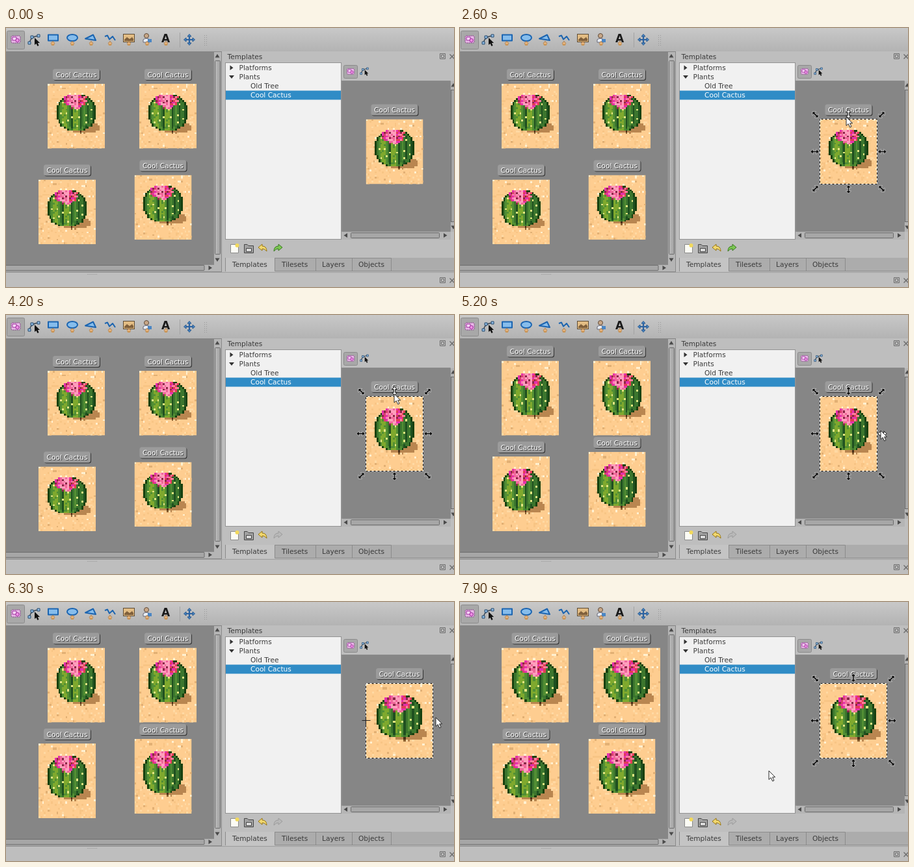
Recreate the animation shown at these times as an HTML page. Size 689 by 399 pixels, loop 8 s.

```html
<!DOCTYPE html>
<html lang="en">
<head>
<meta charset="utf-8">
<title>Template editor</title>
<style>
html, body { margin: 0; width: 100%; height: 100%; overflow: hidden; background: #bebebe; }
svg { display: block; width: 689px; height: 399px; }
text { font: 10.6px "DejaVu Sans", sans-serif; fill: #3a3a3a; }
.light { fill: #fff; }
.chip text { text-anchor: middle; }
</style>
</head>
<body>
<svg viewBox="0 0 689 399">
  <defs>
    <linearGradient id="bar" x2="0" y2="1"><stop stop-color="#c8c8c8"/><stop offset="1" stop-color="#b3b3b3"/></linearGradient>
    <linearGradient id="thumb"><stop stop-color="#b9b9b9"/><stop offset="1" stop-color="#a2a2a2"/></linearGradient>
    <symbol id="tile" viewBox="0 0 32 36" preserveAspectRatio="none"></symbol>
    <g id="hand">
      <path d="M-4-1Q-4-3-1-3L-1-5H1L1-3Q4-3 4-1L3 2H-3Z" fill="#e6b47c" stroke="#9c6c3a" stroke-width=".8"/>
      <path d="M-3 2H3V4H-3Z" fill="#d09040"/>
    </g>
    <path id="arrow" d="M-6.5 0L-2.5-4V-1.2H2.5V-4L6.5 0L2.5 4V1.2H-2.5V4Z" stroke-linejoin="round"/>
    <path id="turn" d="M-7-1L-1-6V-3Q6-3 6 5Q3 1-1 1V4Z" stroke-width="1" stroke-linejoin="round"/>
    <g id="dock" fill="none" stroke="#6c6c6c">
      <path d="M667.500-4.500h8v8h-8zM669.500-2.500h4v4h-4z"/>
      <path d="M682.500-3.500l7 7M689.500-3.500l-7 7" stroke-width="1.4"/>
    </g>
    <g id="pick" stroke="#9c2f9c">
      <rect x="-7" y="-5" width="14" height="11" rx="2" fill="#e9b8e8" stroke="#7d3a80" stroke-dasharray="2 1"/>
      <path d="M-5-3H1V2H-5Z" fill="#f7d8f6"/>
      <circle cx="2.500" cy="2" r="2.700" fill="#ee8fe4"/>
    </g>
    <g id="nodes">
      <path d="M-7 6Q-5-4 7-5" fill="none" stroke="#3b4a58" stroke-width="1.6"/>
      <path d="M-9 4h4v4h-4zM-5-5h4v4h-4zM5-7h4v4h-4z" fill="#8fbbe4" stroke="#24486c"/>
      <path d="M1-2V9L3.500 7L5.500 11L7.500 10L5.800 6H9Z" fill="#111"/>
    </g>
  </defs>

  <rect width="689" height="399" fill="#bebebe"/>
  <rect width="689" height="36" fill="url(#bar)"/>
  <path d="M0 36.500H332" stroke="#858585"/>

  <!-- main toolbar -->
  <rect x="1.500" y="4.500" width="27" height="28" rx="2" fill="#a8a8a8" stroke="#8a8a8a"/>
  <use href="#pick" x="15" y="17"/>
  <use href="#nodes" x="43" y="17"/>
  <g fill="#86bdec" stroke="#1b64b0" stroke-width="2" stroke-linejoin="round">
    <rect x="65" y="10.500" width="15" height="9"/>
    <ellipse cx="102" cy="15" rx="8" ry="5"/>
    <path d="M122 16.500L134 10.500L138 19Z"/>
    <path d="M152 13L156 11.500L159 17.500L164 13L168 19" fill="none"/>
  </g>
  <rect x="180.500" y="9.500" width="17" height="12" fill="#e3bd84" stroke="#5c4a34"/>
  <path d="M182 18L186 14L190 17L194 14L196 17V20H182Z" fill="#80603c"/>
  <circle cx="216" cy="12" r="3.500" fill="#c9a888" stroke="#5c4838"/>
  <path d="M211 22V18Q216 14 221 18V22Z" fill="#e9eef5" stroke="#667"/>
  <path d="M218 17H224V22H218Z" fill="#4a86c4"/>
  <text x="239" y="22" style="font-weight:bold;font-size:17px;fill:#1a1a1a">A</text>
  <g id="hands"></g>
  <path d="M267.500 7V30" stroke="#a2a2a2"/>
  <path d="M282 12V24M276 18H288" stroke="#2c62a0" stroke-width="2.200"/>
  <path d="M282 9.500L285 13H279ZM282 26.500L285 23H279ZM273.500 18L277 15V21ZM290.500 18L287 15V21Z" fill="#4c8cca" stroke="#24568e"/>
  <path d="M305.500 11V27M308.500 11V27" stroke="#989898" stroke-dasharray="1 2"/>

  <!-- map view -->
  <rect y="37" width="320" height="327" fill="#868686"/>
  <rect x="320" y="37" width="11" height="327" fill="#b5b5b5"/>
  <rect x="321.500" y="50.500" width="8" height="298" rx="1" fill="url(#thumb)" stroke="#6a6a6a"/>
  <rect y="364" width="331" height="12" fill="#b5b5b5"/>
  <rect x="-3" y="365.500" width="308" height="8" rx="1" fill="#a6a6a6" stroke="#6a6a6a"/>
  <path d="M331.500 37V376M0 364.500H320M0 375.500H331" stroke="#898989" fill="none"/>
  <path d="M125 379.500H141" stroke="#999" stroke-dasharray="1 1"/>

  <!-- template dock -->
  <text x="340.500" y="48">Templates</text>
  <use href="#dock" y="44"/><use href="#dock" y="389"/>
  <rect x="337.500" y="53.500" width="178" height="272" fill="#f1f1f1" stroke="#929292"/>
  <rect x="338" y="96.500" width="177" height="14" fill="#308cc6"/>
  <path d="M344.500 57.500V65L349.500 61.200Z M343 73H351L347 78Z" fill="#333"/>
  <text x="358.500" y="65">Platforms</text>
  <text x="358.500" y="79">Plants</text>
  <text x="376" y="93">Old Tree</text>
  <text x="376" y="107" class="light">Cool Cactus</text>
  <rect x="519.500" y="57.500" width="21" height="20" rx="2" fill="#a8a8a8" stroke="#8a8a8a"/>
  <use href="#pick" transform="translate(530 66.500) scale(.8)"/>
  <use href="#nodes" transform="translate(551 66) scale(.7)"/>
  <rect x="516" y="82" width="167" height="231" fill="#868686"/>
  <path d="M516 81.500H683.500V313.500H516.500V81.500" fill="none" stroke="#8c8c8c"/>
  <rect x="684" y="82" width="6" height="232" fill="#b5b5b5"/>
  <rect x="684.500" y="95.500" width="9" height="203" fill="#a6a6a6" stroke="#6a6a6a"/>
  <rect x="516" y="314" width="168" height="12" fill="#b5b5b5"/>
  <rect x="530.500" y="315.500" width="136" height="8" rx="1" fill="#a6a6a6" stroke="#6a6a6a"/>
  <g id="arrows" fill="#4a4a4a"></g>

  <!-- dock buttons -->
  <path d="M345.500 333.500H357.500V346.500H345.500Z" fill="#fbfbf4" stroke="#8a8a8a"/>
  <circle cx="355.500" cy="335" r="3" fill="#f2d95c"/>
  <path d="M366.500 346.500V333.500H371L373 335.500H380.500V346.500Z" fill="#a2a2a2" stroke="#444"/>
  <path d="M369.500 339.500H377.500V344.500H369.500Z" fill="#ddd" stroke="#444"/>
  <use href="#turn" x="395" y="339" fill="#f1d870" stroke="#987614"/>
  <use href="#turn" id="redo" transform="translate(418 339) scale(-1 1)"/>

  <!-- tabs -->
  <rect x="413" y="354" width="276" height="20" fill="#acacac"/>
  <rect x="338" y="354" width="75" height="21" fill="#c4c4c4"/>
  <path d="M413.500 354.500H592.500V374.500M476.500 355V374M532.500 355V374M413.500 354V374.500H689M337.500 375V354" fill="none" stroke="#8b8b8b"/>
  <text x="348" y="368">Templates</text>
  <text x="424" y="368">Tilesets</text>
  <text x="486" y="368">Layers</text>
  <text x="542" y="368">Objects</text>
  <path d="M0 376.500H689" stroke="#a0a0a0"/>

  <g id="scene"></g>
  <path id="cursor" d="M0 0V13.500L3.200 10.600L5.700 16L8 15L5.600 9.800H9.700Z" fill="#fff" stroke="#2b2b2b" stroke-linejoin="round"/>
</svg>
<script>
const $ = id => document.getElementById(id);
const LOOP = 8000, STEP = 100;

// Pixel tile: sand, shadow and a ribbed cactus on a 32 x 36 grid
function paintTile() {
  const paths = {};
  let seed = 11;
  const rnd = () => (seed = (seed * 16807) % 2147483647) / 2147483647;
  const put = (x, y, c) => { paths[c] = (paths[c] || '') + `M${x} ${y}h1v1h-1z`; };
  const body = (x, y) => {
    const power = y < 15 ? 2.2 : 2.6;
    return Math.abs((x - 15.5) / 11) ** power + Math.abs((y - 15.3) / 10.3) ** power < 1;
  };
  const blob = (x, y, cx, cy, rx, ry) => ((x - cx) / rx) ** 2 + ((y - cy) / ry) ** 2;
  const ribs = 'dmglllgmdlllgdmgmdmmdd';
  const green = { d: '#1f5020', m: '#3c762e', g: '#528f34', l: '#7fa92e' };

  const sand = () => {
    const r = rnd();
    return r < .025 ? '#fff0d0' : r < .055 ? '#e2b074' : r < .15 ? '#f8c585' : r < .21 ? '#ffd9a3' : null;
  };
  const petal = (x, y) => {
    const r = rnd();
    if (r < .1) return '#8a2848';
    if (x < 12) return r < .55 ? '#e62fae' : r < .8 ? '#ff83b5' : '#d8406c';
    if (x < 17) return r < .75 ? '#ff9fbd' : '#f0679b';
    return r < .4 ? '#e23c55' : r < .7 ? '#ff7f9d' : '#e62fae';
  };
  const plant = (x, y) => {
    if (y > 5 && blob(x, y, 15, 9, 6.6, 4.2) < .65 + .5 * rnd()) return petal(x, y);
    if (!body(x + 1, y) || !body(x, y - 1) || !body(x - 1, y)) return '#17400f';
    const bend = Math.sqrt(1 - .35 * ((y - 15.3) / 10.3) ** 2);
    const i = Math.floor(((x - 15.5) / 11 / bend + 1) * 11);
    const c = ribs[Math.max(0, Math.min(21, i))];
    return green[c === 'l' && rnd() < .25 ? 'g' : c];
  };

  for (let y = 0; y < 36; y++) for (let x = 0; x < 32; x++) {
    const c = body(x, y) ? plant(x, y)
      : blob(x, y, 20, 23.6, 9, 3.4) < 1 ? '#b98650' : sand();
    if (c) put(x, y, c);
  }
  const spines = [[8, 10], [10, 16], [7, 16], [11, 20], [16, 14], [17, 18], [21, 17],
    [24, 14], [16, 23], [21, 21], [8, 21], [13, 18], [22, 11], [24, 19]];
  spines.forEach(([x, y]) => put(x, y, '#e4e682'));
  put(18, 26, '#4a3018');
  put(18, 27, '#8a6030');
  return '<path d="M0 0H32V36H0Z" fill="#fecd90"/><g shape-rendering="crispEdges">' +
    Object.entries(paths).map(([c, d]) => `<path fill="${c}" d="${d}"/>`).join('') + '</g>';
}

// Piecewise motion through [time, value, ...] keys
function track(keys, t, ease = k => k) {
  if (t <= keys[0][0]) return keys[0].slice(1);
  for (let i = 1; i < keys.length; i++) {
    const a = keys[i - 1], b = keys[i];
    if (t <= b[0]) {
      const k = ease((t - a[0]) / (b[0] - a[0]));
      return a.slice(1).map((v, j) => v + (b[j + 1] - v) * k);
    }
  }
  return keys[keys.length - 1].slice(1);
}
const smooth = k => k * k * (3 - 2 * k);

const pointer = [[800, 459, 1], [1100, 520, 74], [1500, 586, 165], [2000, 586, 165], [2500, 594, 137],
  [2800, 594, 137], [3100, 597, 137]];
const toSide = [[4300, 597, 121], [5100, 647, 178]];
const leave = [[6900, 661, 178], [7300, 643, 186], [7600, 545, 230], [7850, 475, 260]];
const growth = [[3100, 0], [4000, 15.5]];
const widening = [[5400, 0], [5900, 10], [6300, 15]];

function cursorAt(t, rise, extra) {
  if (t < 3100) return track(pointer, t, t < 1500 ? undefined : smooth);
  if (t < 4300) return [597, 137 - rise];
  if (t < 5400) return track(toSide, t, smooth);
  if (t < 6900) return [647 + extra * 14 / 15, 178];
  return track(leave, t);
}

function chip(cx, top) {
  const y = top - 23, x = cx - 36;
  return `<g class="chip"><rect x="${x + 1}" y="${y + 1}" width="72" height="17" rx="3.5" fill="#333"/>
    <rect x="${x}" y="${y}" width="72" height="17" rx="3.5" fill="#9b9b9b"/>
    <text x="${x + 37}" y="${y + 13.5}">Cool Cactus</text>
    <text x="${x + 36}" y="${y + 12.5}" class="light">Cool Cactus</text></g>`;
}

function thing(x, y, w, h) {
  return `<use href="#tile" x="${x}" y="${y}" width="${w}" height="${h}"/>` + chip(x + w / 2, y);
}

function handles(x, y, w, h, [px, py]) {
  let out = '';
  for (const i of [-1, 0, 1]) for (const j of [-1, 0, 1]) {
    if (!i && !j) continue;
    const gap = i && j ? 7 : 8;
    const cx = x + w / 2 * (1 + i) + i * gap, cy = y + h / 2 * (1 + j) + j * gap;
    const hot = Math.hypot(px - cx, py - cy) < 8;
    const turn = Math.atan2(j, i) * 180 / Math.PI;
    out += `<use href="#arrow" transform="translate(${cx} ${cy}) rotate(${turn})" ` +
      (hot ? 'fill="#fff" stroke="#111"/>' : 'fill="#0a0a0a" stroke="#ddd" stroke-width=".7"/>');
  }
  return out;
}

// Marching ants, kept on whole pixels
function outline(x, y, w, h, t) {
  const snap = v => Math.floor(v) + .5;
  const l = snap(x), r = snap(x + w), top = snap(y), b = snap(y + h);
  const box = `<path d="M${l} ${top}H${r}V${b}H${l}Z" fill="none" stroke=`;
  return box + '"#fff"/>' + box + `"#111" stroke-dasharray="3 3" stroke-dashoffset="${-t / STEP % 6}"/>`;
}

function draw(t) {
  const [rise] = track(growth, t), [extra] = track(widening, t);
  const pos = cursorAt(t, rise, extra);
  const up = t >= 4300 ? 15.5 : 0, wide = t >= 6600 ? 15 : 0;
  let out = [[64, 86], [205, 86], [50, 233.5], [197.5, 226.5]]
    .map(([x, y]) => thing(x, y - up, 88 + wide, 99.5 + up)).join('');

  const box = [553.5, 140.5 - rise, 88 + extra, 100 + rise];
  out += thing(...box);
  if (t >= 1700) {
    const pullUp = t >= 3100 && t < 4100, pullSide = t >= 5400 && t < 6500;
    out += outline(...box, t);
    if (pullUp || pullSide) {
      const ax = pullUp ? 597.5 : 553.5, ay = pullUp ? 240.5 : 182.5;
      out += `<path d="M${ax - 6} ${ay}h13M${ax} ${ay - 6}v13" stroke="#222"/>`;
    } else out += handles(...box, pos);
  }
  $('scene').innerHTML = out;
  $('cursor').setAttribute('transform', `translate(${pos})`);
  $('cursor').setAttribute('visibility', t < 800 ? 'hidden' : 'visible');
  const spent = t >= 4100;
  $('redo').setAttribute('fill', spent ? '#b8b8b8' : '#7cc653');
  $('redo').setAttribute('stroke', spent ? '#9c9c9c' : '#3b7a22');
}

$('tile').innerHTML = paintTile();
$('hands').innerHTML = [72, 102, 131, 160, 189, 217, 246]
  .map(x => `<use href="#hand" transform="translate(${x} 24) scale(.7)"/>`).join('');
$('arrows').innerHTML = [[325, 43, 0], [325, 357, 180], [314, 369.5, 90], [688, 88, 0], [688, 307, 180],
  [522.5, 319.5, -90], [675.5, 319.5, 90]]
  .map(([x, y, r]) => `<path d="M-3.500 2.500L0-3L3.500 2.500Z" transform="translate(${x} ${y}) rotate(${r})"/>`).join('');

let shown = -1;
const start = performance.now();
function tick() {
  const t = Math.floor((performance.now() - start) % LOOP / STEP) * STEP;
  if (t !== shown) draw(shown = t);
  requestAnimationFrame(tick);
}
tick();
</script>
</body>
</html>
```
